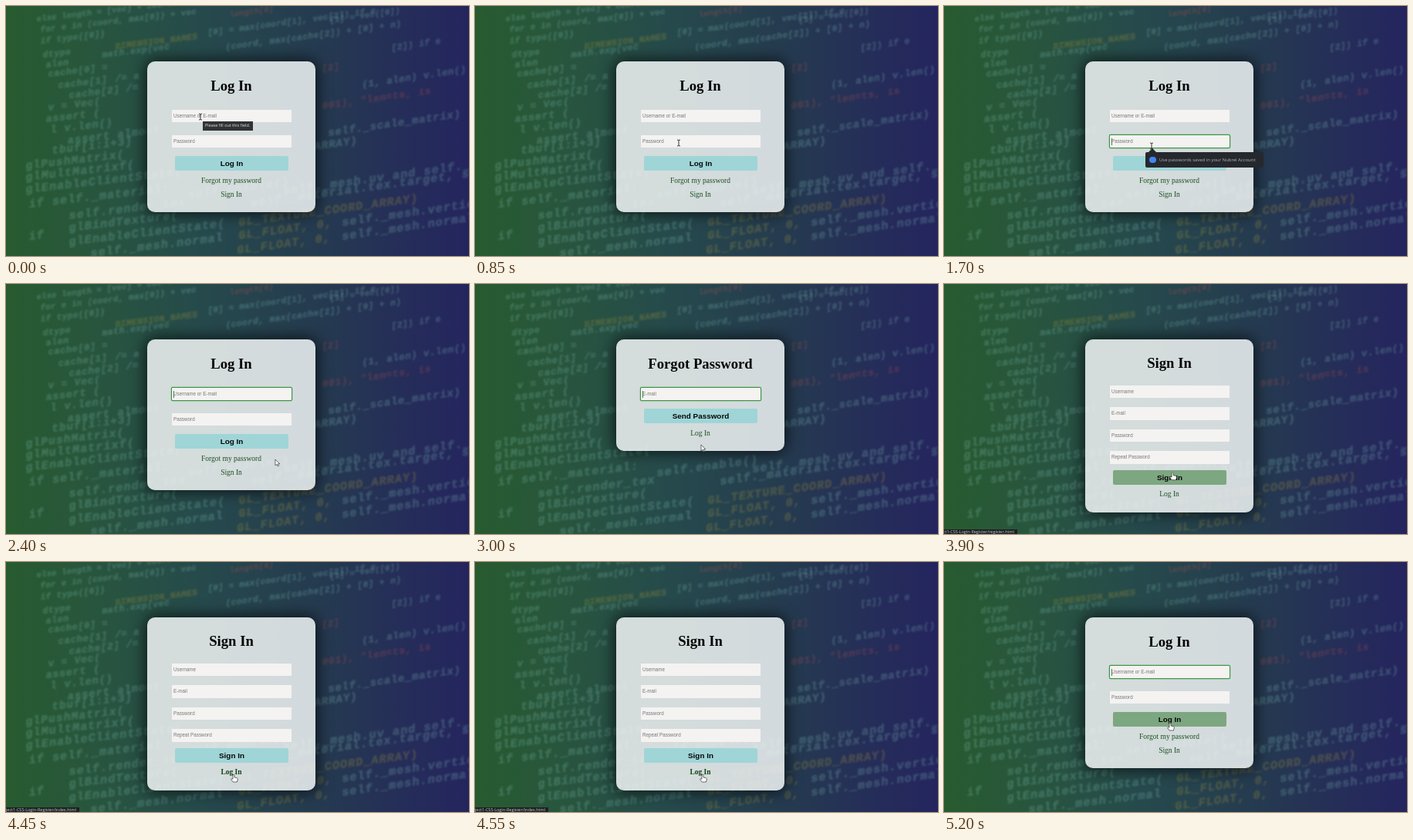
Write an HTML page that moves like this. It is 600 by 325 pixels and loops after 5.25 s.

```html
<!DOCTYPE html>
<html lang="en">
<head>
<meta charset="utf-8">
<title>Login form</title>
<style>
html, body { margin: 0; width: 100%; height: 100%; overflow: hidden; }
#stage {
  position: relative; width: 600px; height: 325px; overflow: hidden;
  background: linear-gradient(to right, #275b2f 0, #28563c 17%, #264a4c 42%, #253a50 68%, #252d59 86%, #24255e 100%);
}
#stage * { box-sizing: border-box; }
#stage div, svg { position: absolute; white-space: nowrap; }
svg { left: 0; top: 0; overflow: visible; }
.code {
  font-family: "Liberation Mono", monospace; font-weight: bold; font-style: italic;
  stroke-width: .5; filter: blur(.8px);
}
.card {
  left: 182.8px; top: 72px; width: 218.6px; border-radius: 10px;
  background: rgba(243, 246, 246, .85); box-shadow: 0 0 19px 2px rgba(0, 0, 0, .7);
}
.title { font: bold 18.7px/22px "Liberation Serif", serif; text-align: center; color: #050505; }
.field { font: 6.3px/16.5px "Liberation Sans", sans-serif; padding-left: 2px; color: #777; background: #f4f3f2; }
.field.focus { box-shadow: 0 0 0 1.2px #3f9644; border-radius: 1px; }
.caret { background: #55705a; }
.button {
  font: bold 9.9px/19px "Liberation Sans", sans-serif; text-align: center;
  color: #080808; background: #9fd5d7; border-radius: 2px;
}
.button.hover { background: #7da780; }
.link { font: 9.5px/12px "Liberation Serif", serif; text-align: center; color: #1d5122; }
.link.hover { font-weight: bold; color: #134518; }
.tip, .popup, .status { font-family: "Open Sans", sans-serif; }
.tip { font-size: 5.45px; line-height: 11.5px; padding-left: 3px; color: #e4e4e4; background: #303234; }
.popup { font-size: 5.95px; line-height: 20.5px; padding-left: 18px; color: #b3b6b9; background: #25292d; border-radius: 2px; }
.popup i { position: absolute; left: 5px; top: 6px; width: 8.5px; height: 8.5px; border-radius: 50%; background: #4285f4; }
.popup b { position: absolute; left: 4px; top: -5px; border: 5px solid transparent; border-top: 0; border-bottom-color: #25292d; }
.status { font-size: 5.5px; line-height: 7px; color: #c8cacc; background: #1d2022; }
.status span { position: absolute; right: 4px; top: 0; }
</style>
</head>
<body>
<div id="stage"></div>
<script>
const LOOP = 5250, CENTER = 292;
const stage = document.getElementById("stage");

function box(parent, cls, x, y, w, h, text = "") {
  const e = document.createElement("div");
  e.className = cls;
  Object.assign(e.style, { left: x + "px", top: y + "px", width: w + "px", height: h + "px" });
  e.textContent = text;
  parent.append(e);
  return e;
}

function svg(parent, tag, attrs) {
  const e = document.createElementNS("http://www.w3.org/2000/svg", tag);
  for (const k in attrs) e.setAttribute(k, attrs[k]);
  parent.append(e);
  return e;
}

// Slanted code behind the form: x, y, text, ink
const INK = { n: "#8ccdc3", o: "#bea53c", r: "#c85555" };
const code = [
  [40, 20, "else length = [vec] + coord"], [45, 34, "for e in (coord, max[0]) + vec"],
  [45, 49, "if type([0])"], [142, 56, "DIMENSION_NAMES", "o"], [290, 14, "length[0]", "r"],
  [262, 38, "[0] = max(coord[1], vec[2]) if e"], [285, 57, "(coord, max(cache[2]) + [0] + n)"],
  [48, 67, "dtype"], [125, 67, "math.exp(vec"], [420, 22, "[1] = vec([0])"], [500, 58, "[2]) if e"],
  [52, 80, "alen"], [55, 92, "cache[0] ="], [68, 107, "cache[1]"], [142, 98, "/= a"], [410, 85, "[2]", "r"],
  [82, 120, "cache[2] /="], [462, 106, "(1, alen) v.len()"], [410, 134, "001),", "r"], [460, 127, '"len=ts, is', "r"],
  [55, 136, "v = Vec("], [52, 151, "assert ("], [58, 165, "l   v.len()"], [80, 179, "assert almost"],
  [60, 192, "tbuf[i:i+3]"], [418, 169, "self._scale_matrix)"], [400, 187, "ARRAY)"],
  [26, 212, "glPushMatrix("], [26, 227, "glMultMatrixf("], [26, 243, "glEnableClientState("],
  [30, 262, "if self._material:"], [236, 250, "self.enable()"], [360, 245, "self._mesh.uv and self._mu"],
  [82, 277, "self.render_tex"], [318, 261, "self._material.tex.target, self._m"],
  [82, 293, "glBindTexture("], [30, 304, "if"], [302, 286, "GL_TEXTURE_COORD_ARRAY)", "o"],
  [82, 311, "glEnableClientState("], [302, 303, "GL_FLOAT, 0,", "o"], [436, 286, "self._mesh.vertices"],
  [110, 326, "self._mesh.normal"], [300, 322, "GL_FLOAT, 0,", "o"], [436, 304, "self._mesh.normal"]
];
const back = svg(stage, "svg", { width: 600, height: 325, class: "code" });
for (const [x, y, text, ink = "n"] of code) {
  const near = Math.min(y / 230, 1);
  svg(back, "text", {
    transform: `translate(${x} ${y}) rotate(${-6.5 - x / 240})`,
    fill: INK[ink], stroke: INK[ink], opacity: .25,
    "font-size": 10 + 5.2 * near, "letter-spacing": .2 + .9 * near
  }).textContent = text;
}

// Forms
function makePage({ height, title, titleY, fields, button, links }) {
  const root = box(stage, "page", 0, 0, 600, 325);
  box(root, "card", 182.8, 72, 218.6, height);
  box(root, "title", 183, titleY, 218, 22, title);
  const targets = [], inputs = {};
  const add = (kind, x, y, w, h, text) => {
    const e = box(root, kind, x, y, w, h, text);
    targets.push({ e, kind, x, y, w, h });
    return e;
  };
  for (const [id, y, text] of fields) {
    const e = add("field", 215, y, 155, 16.5, text);
    inputs[id] = { e, caret: box(e, "caret", 2, 4, 1, 9) };
  }
  add("button", 219, button[0], 147, 18.5, button[1]);
  for (const [y, text, w] of links) add("link", CENTER - w / 2, y - 6, w, 12, text);
  return { root, targets, inputs };
}

const pages = {
  login: makePage({
    height: 195.5, title: "Log In", titleY: 92.7,
    fields: [["user", 134.8, "Username or E-mail"], ["pass", 167.8, "Password"]],
    button: [195, "Log In"], links: [[226.5, "Forgot my password", 78], [244.5, "Sign In", 28]]
  }),
  forgot: makePage({
    height: 144.5, title: "Forgot Password", titleY: 92.7,
    fields: [["mail", 134.8, "E-mail"]],
    button: [162, "Send Password"], links: [[193.5, "Log In", 28]]
  }),
  sign: makePage({
    height: 224.5, title: "Sign In", titleY: 91.7,
    fields: [["name", 131.6, "Username"], ["mail", 160.1, "E-mail"], ["pass", 188.6, "Password"], ["again", 217, "Repeat Password"]],
    button: [242, "Sign In"], links: [[273, "Log In", 28]]
  })
};

// Overlays
const tip = box(stage, "tip", 255, 150, 65, 12, "Please fill out this field.");
const popup = box(stage, "popup", 261, 189.7, 152.5, 20.6, "Use passwords saved in your Nubrel Account");
popup.append(document.createElement("i"), document.createElement("b"));
const status = box(stage, "status", 0, 319.3, 95, 7);
const statusText = document.createElement("span");
status.append(statusText);

const layer = svg(stage, "svg", { width: 600, height: 325 });
const cursor = svg(layer, "g", {});
const pointer = { fill: "#fff", stroke: "#333", "stroke-width": .7, "stroke-linejoin": "round" };
const shapes = {
  field: svg(cursor, "path", { d: "M-2-4Q0-4 0-3Q0-4 2-4M0-3V3M-2 4Q0 4 0 3Q0 4 2 4", fill: "none", stroke: "#222", "stroke-width": .9 }),
  arrow: svg(cursor, "path", { d: "M0 0V8L1.9 6.3L3.2 9L4.5 8.4L3.3 5.8H5.8Z", ...pointer }),
  hand: svg(cursor, "path", { d: "M-1 .8Q0-.8 1 .8V4L4.5 4.8Q5.6 5.2 5.2 7L4.4 10H-.8L-3.4 6.6Q-3.4 5-1 6.2Z", ...pointer })
};

// Timeline
const pageSteps = [[0, "login"], [2750, "forgot"], [3400, "login"], [3900, "sign"], [4750, "login"]];
const focusSteps = [[0, ""], [1250, "pass"], [2000, "user"], [2750, "mail"], [3400, "user"], [3900, ""], [4750, "user"]];
const path = [
  [0, 252, 144], [450, 252, 144], [850, 264, 178], [1150, 269, 182], [1700, 269, 182],
  [1950, 280, 146], [2100, 282, 147], [2400, 349, 228], [2600, 314, 227], [2750, 302, 226],
  [3000, 293, 209], [3200, 292, 194], [3400, 292, 194], [3500, 306, 207], [3720, 297, 243],
  [3950, 296, 245], [4250, 295, 276], [4800, 295, 276], [5120, 293, 209], [LOOP, 293, 209]
];
const statuses = [
  [2600, 2900, "forgot"], [3150, 3450, "index"], [3700, 4050, "register"], [4250, 4980, "index"]
];

const clamp = v => Math.max(0, Math.min(1, v));
const fade = (t, from, to) => clamp((t - from) / 100) * clamp((to + 100 - t) / 100);
const stepAt = (steps, t) => steps.filter(s => s[0] <= t).pop();

function placeAt(t) {
  const i = path.findIndex(p => p[0] > t);
  const [t0, x0, y0] = path[i - 1], [t1, x1, y1] = path[i];
  const u = (t - t0) / (t1 - t0), k = u * u * (3 - 2 * u);
  return [x0 + (x1 - x0) * k, y0 + (y1 - y0) * k];
}

function draw(t) {
  const name = stepAt(pageSteps, t)[1], page = pages[name];
  for (const key in pages) pages[key].root.style.display = key === name ? "" : "none";

  const [since, focus] = stepAt(focusSteps, t);
  for (const id in page.inputs) {
    const { e, caret } = page.inputs[id], on = id === focus;
    e.classList.toggle("focus", on);
    caret.style.display = on && (t - since) % 1000 < 500 ? "" : "none";
  }

  const [x, y] = placeAt(t);
  let shape = "arrow";
  for (const g of page.targets) {
    const over = x >= g.x && x <= g.x + g.w && y >= g.y && y <= g.y + g.h;
    g.e.classList.toggle("hover", over);
    if (over) shape = g.kind === "field" ? "field" : "hand";
  }
  for (const key in shapes) shapes[key].style.display = key === shape ? "" : "none";
  cursor.setAttribute("transform", `translate(${x} ${y})`);

  tip.style.opacity = t < 400 ? 1 : 0;
  popup.style.opacity = fade(t, 1300, 1850);
  const note = statuses.find(s => t >= s[0] && t < s[1] + 100);
  status.style.opacity = note ? fade(t, note[0], note[1]) : 0;
  if (note) statusText.textContent = `project1-CSS-Login-Register/${note[2]}.html`;
}

const start = performance.now();
function tick() {
  draw((performance.now() - start) % LOOP);
  requestAnimationFrame(tick);
}
draw(0);
requestAnimationFrame(tick);
</script>
</body>
</html>
```
